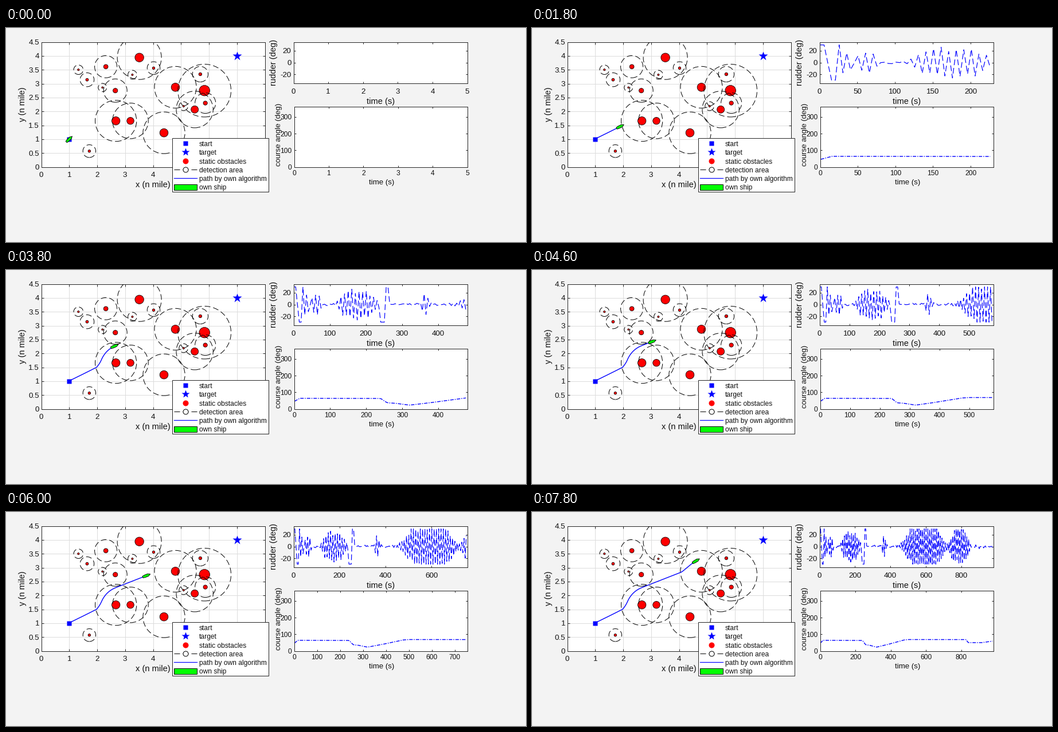
These frames come from a looping animation (907x375 px, 8 s). A matplotlib script:

```python
import numpy as np
import matplotlib.pyplot as plt
from matplotlib.animation import FuncAnimation
from matplotlib.patches import Circle, Polygon, Rectangle

W, H, DPI = 907, 375, 64
PT = 72 / DPI                      # points per pixel
INK, TEXT, BLUE, GREEN = "#262626", "#101010", "#0000ff", "#00ff00"
FRAMES, INTERVAL, SUBSTEPS = 40, 200, 5

plt.rcParams.update({
    "font.family": "Liberation Sans", "axes.unicode_minus": False,
    "axes.edgecolor": INK, "axes.linewidth": PT, "lines.scale_dashes": False,
    "text.color": TEXT, "xtick.color": INK, "ytick.color": INK,
    "xtick.labelcolor": TEXT, "ytick.labelcolor": TEXT,
})


def dashes(*lengths):
    return 0, tuple(PT * d for d in lengths)


DASH, DASH_DOT = dashes(10, 5), dashes(6, 2, 1.5, 2)

# ---- simulated voyage, one sample every 5 s ----
SPEED = 0.00446                    # nautical miles per second
k = np.arange(SUBSTEPS * (FRAMES - 1) + 1)
t = 1 + 5 * k

# time and course at each change of heading
turns = [(1, 46), (16, 64), (240, 63), (258, 37), (281, 34), (320, 23),
         (383, 39), (476, 66), (500, 68.6), (826, 68.4), (838, 50),
         (915, 50), (976, 59)]
course = np.interp(t, *zip(*turns))
heading = np.radians((course[1:] + course[:-1]) / 2)
steps = 5 * SPEED * np.column_stack([np.sin(heading), np.cos(heading)])
track = np.vstack([[1, 1], 1 + np.cumsum(steps, axis=0)])

# rudder: bursts that flip side at each sample, plus hard-over turns
rng = np.random.default_rng(4)
bursts = [(30, 14, -20), (61, 14, 17), (175, 52, 26), (363, 11, 19),
          (590, 108, 40), (790, 52, 32)]
swing = sum(peak * np.exp(-((t - mid) / width) ** 4)
            for mid, width, peak in bursts)
rudder = swing * (-1.0) ** k * rng.uniform(0.7, 1, k.size)
rudder += rng.normal(0, 1.2, k.size)
for start, end, angle in [(1, 6, 30), (16, 21, -30), (26, 26, 30),
                          (241, 251, -30), (256, 261, 30)]:
    rudder[(t >= start) & (t <= end)] = angle
rudder = np.clip(rudder, -30, 30)

# ---- layout ----
fig = plt.figure(figsize=(W / DPI, H / DPI), dpi=DPI, facecolor="#f3f3f3")


def panel(left, top, right, bottom, font, tick, xpad, ypad):
    ax = fig.add_axes([left / W, 1 - bottom / H,
                       (right - left) / W, (bottom - top) / H])
    ax.tick_params(direction="in", top=True, right=True, length=tick * PT,
                   width=PT, labelsize=font * PT)
    ax.tick_params(axis="x", pad=xpad * PT)
    ax.tick_params(axis="y", pad=ypad * PT)
    return ax


def label(x, y, text, size, rotation=0, ha="center"):
    fig.text(x / W, 1 - y / H, text, size=size * PT, rotation=rotation,
             ha=ha, va="baseline", rotation_mode="anchor", zorder=10)


def mark(ax, x, y, shape, size, color=BLUE, edge="none"):
    ax.plot([x], [y], ls="none", marker=shape, ms=size * PT, mfc=color,
            mec=edge, mew=PT, zorder=5)


sea = panel(61.5, 24.5, 451.5, 243.5, 13.33, 4, 8.5, 3.5)
sea.set(xlim=(0, 8), ylim=(0, 4.5), xticks=range(9),
        yticks=np.arange(0, 4.6, 0.5))
sea.yaxis.set_major_formatter(lambda v, _: f"{v:g}")
sea.set_axisbelow(True)
sea.grid(color="#dcdcdc", lw=PT)

rud = panel(501.5, 24.5, 804.5, 96.5, 13.33, 3, 9, 4)
rud.set(ylim=(-35, 35), yticks=[-20, 0, 20])
crs = panel(502.5, 138.5, 804.5, 243.5, 12, 3, 6, 4)
crs.set(ylim=(0, 360), yticks=range(0, 301, 100))

label(256.5, 279, "x (n mile)", 14.67)
label(32.5, 134, "y (n mile)", 14.67, 90)
label(653.5, 133, "time (s)", 14.67)
label(471, 60, "rudder (deg)", 14.67, 90)
label(655, 274, "time (s)", 13.2)
label(479.5, 187, "course angle (deg)", 13.2, 90)

# ---- obstacles: x, y and detection radius in nautical miles ----
obstacles = [
    (1.33, 3.50, .17), (1.64, 3.14, .25), (2.31, 3.61, .40),
    (2.19, 2.86, .15), (2.65, 2.75, .42), (3.51, 3.94, .79),
    (3.26, 3.32, .16), (4.02, 3.56, .23), (4.80, 2.87, .75),
    (5.84, 2.75, .95), (5.69, 3.34, .28), (5.87, 2.30, .37),
    (5.49, 2.07, .66), (5.09, 2.19, .16), (2.67, 1.66, .74),
    (3.19, 1.66, .64), (4.39, 1.23, .75), (1.72, 0.57, .23)]
for x, y, reach in obstacles:
    sea.add_patch(Circle((x, y), reach, fill=False, ec="black", lw=PT,
                         ls=DASH, zorder=3))
    sea.add_patch(Circle((x, y), reach / 5, fc="red", ec="black",
                         lw=0.8 * PT, zorder=3))

mark(sea, 1, 1, "s", 8)
mark(sea, 7, 4, "*", 17)
path, = sea.plot([], [], color=BLUE, lw=1.4 * PT, zorder=4)
half = np.array([(1.5, -7), (2.2, -3), (2.2, 3), (0, 7.3)])
hull = np.vstack([half, half[::-1] * (-1, 1)]) / 48.7
ship = sea.add_patch(Polygon(hull, fc=GREEN, ec="black", lw=0.9 * PT,
                             zorder=6))
rud_line, = rud.plot([], [], color=BLUE, lw=1.2 * PT, ls=DASH)
crs_line, = crs.plot([], [], color=BLUE, lw=1.4 * PT, ls=DASH_DOT)

# ---- legend, in pixel coordinates ----
key = fig.add_axes([0, 0, 1, 1], zorder=5)
key.set(xlim=(0, W), ylim=(H, 0))
key.axis("off")
key.add_patch(Rectangle((289.5, 192.5), 168, 94, fc="white", ec=INK, lw=PT))
names = ["start", "target", "static obstacles", "detection area",
         "path by own algorithm", "own ship"]
rows = np.linspace(202, 278.5, len(names))
for y, name in zip(rows, names):
    label(337, y + 5, name, 12, ha="left")
mark(key, 312.8, rows[0], "s", 8)
mark(key, 312.8, rows[1], "*", 14)
mark(key, 312.8, rows[2], "o", 10, "red")
key.plot([293, 333], [rows[3]] * 2, color="black", lw=PT, ls=DASH)
mark(key, 312.8, rows[3], "o", 9, "white", "black")
key.plot([293, 333], [rows[4]] * 2, color=BLUE, lw=1.2 * PT)
key.add_patch(Rectangle((292.5, rows[5] - 5), 40, 10, fc=GREEN, ec="black",
                        lw=PT))


def tick_step(span, most):
    """Smallest 1-2-5 step that gives at most this many intervals."""
    sizes = (base * 10 ** e for e in range(4) for base in (1, 2, 5))
    return next(s for s in sizes if span / s <= most)


def update(i):
    n = SUBSTEPS * i + 1
    span = 5 * n
    for ax, line, data, most in ((rud, rud_line, rudder, 7.2),
                                 (crs, crs_line, course, 8)):
        line.set_data(t[:n], data[:n])
        ax.set_xticks(np.arange(0, span + 1, tick_step(span, most)))
        ax.set_xlim(0, span)
    path.set_data(track[:n, 0], track[:n, 1])
    a = np.radians(course[n - 1])
    turn = np.array([[np.cos(a), -np.sin(a)], [np.sin(a), np.cos(a)]])
    ship.set_xy(hull @ turn + track[n - 1])
    return path, ship, rud_line, crs_line


anim = FuncAnimation(fig, update, frames=FRAMES, interval=INTERVAL,
                     repeat=True, repeat_delay=0, blit=False)
plt.show()
```
